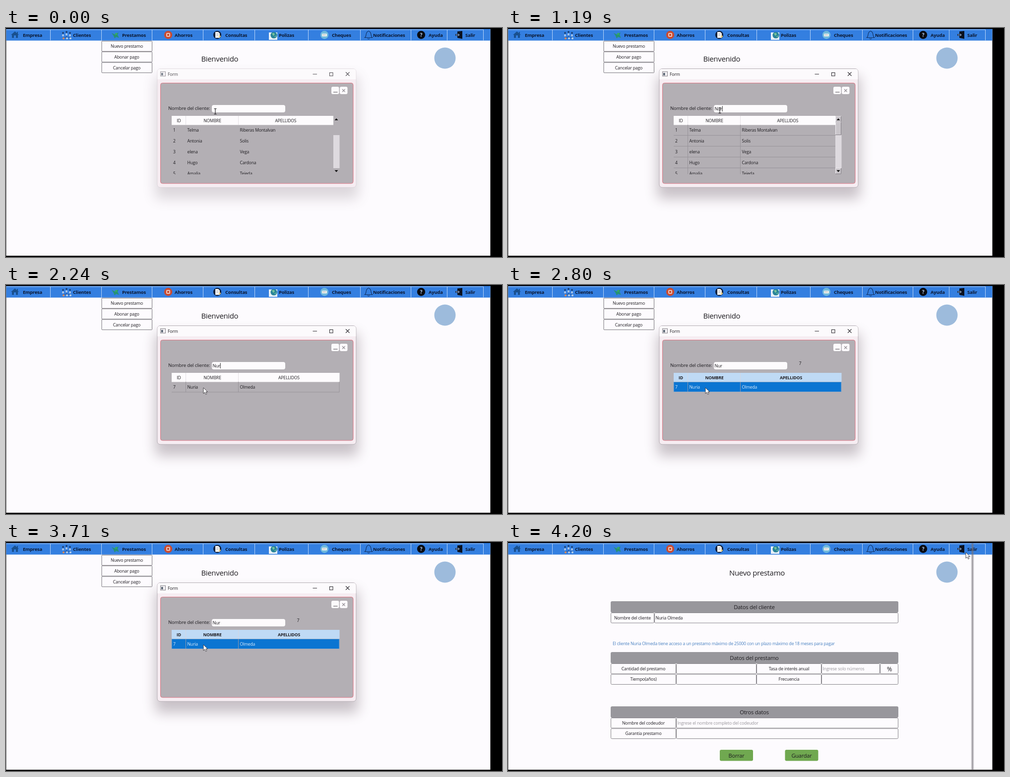
Recreate the animation shown at these times as an HTML page. Size 1000 by 464 pixels, loop 4.27 s.

```html
<!DOCTYPE html>
<html lang="es">
<head>
<meta charset="utf-8">
<title>Nuevo prestamo</title>
<style>
  html, body { margin: 0; width: 100%; height: 100%; overflow: hidden; background: #000; }
  svg { display: block; width: 1000px; height: 464px; }
  text { font-family: "Open Sans", "Noto Sans", sans-serif; letter-spacing: -.02em; fill: #1e1c20; white-space: pre; }
</style>
</head>
<body>
<svg id="stage" viewBox="0 0 1000 464" xmlns="http://www.w3.org/2000/svg">
  <defs>
    <filter id="soft" x="-20%" y="-25%" width="140%" height="160%"><feGaussianBlur stdDeviation="13"/></filter>
    <clipPath id="tableClip"><rect x="333" y="177" width="340" height="119.5"/></clipPath>
    <linearGradient id="edgeFade">
      <stop offset="0" stop-color="#77737a" stop-opacity="0"/>
      <stop offset=".5" stop-color="#77737a" stop-opacity=".75"/>
      <stop offset="1" stop-color="#77737a" stop-opacity="0"/>
    </linearGradient>
  </defs>
  <rect width="1000" height="464" fill="#000"/>
  <rect x=".5" y="2" width="976" height="459.5" fill="#fdfbfe"/>
  <g id="menu"></g>
  <circle cx="885" cy="61" r="21.5" fill="#9dbbdc"/>
  <g id="home"></g>
  <g id="loan"></g>
  <g id="pointer"></g>
</svg>
<script>
const LOOP = 4270, STEP = 70;
const $ = id => document.getElementById(id);

function add(parent, tag, attrs, content) {
  const el = document.createElementNS("http://www.w3.org/2000/svg", tag);
  for (const key in attrs) el.setAttribute(key, attrs[key]);
  if (content !== undefined) el.textContent = content;
  parent.appendChild(el);
  return el;
}
const group = (p, attrs = {}) => add(p, "g", attrs);
const rect = (p, x, y, width, height, fill, more = {}) => add(p, "rect", { x, y, width, height, fill, ...more });
const disc = (p, cx, cy, r, fill) => add(p, "circle", { cx, cy, r, fill });
const path = (p, d, stroke, width = 1, fill = "none") =>
  add(p, "path", { d, stroke, "stroke-width": width, fill });
// y is the middle of the capitals
const label = (p, s, x, y, size = 8.7, more = {}) =>
  add(p, "text", { x, y: y + size * .36, "font-size": size, ...more }, s);
const middle = (p, s, x, y, size = 8.7, more = {}) =>
  label(p, s, x, y, size, { "text-anchor": "middle", ...more });
const show = (el, on) => el.setAttribute("display", on ? "inline" : "none");

function buildMenu() {
  const g = $("menu");
  rect(g, .5, 2, 976, 23.5, "#347fe0");
  path(g, "M1 3.5H963", "#a9cbf5");
  [90, 193, 295, 398, 502, 610, 715, 817, 890, 963].forEach(x => path(g, `M${x - .5} 3V25`, "#b9d5f8"));
  const items = { Empresa: 34, Clientes: 135, Prestamos: 234, Ahorros: 340, Consultas: 442,
    Polizas: 550, Cheques: 657, Notificaciones: 740, Ayuda: 852, Salir: 926 };
  for (const name in items)
    label(g, name, items[name], 15, 9.4, { "font-weight": 700, style: "fill:#0b1730" });

  path(g, "M10 14L18 7L26 14H24V20H20V15H16V20H12V14Z", "none", 0, "#19508f");
  rect(g, 22, 8, 2, 4, "#19508f");

  [[115, 10], [122, 8], [129, 10]].forEach(([x, y]) => {
    disc(g, x, y, 1.8, "#193765");
    path(g, `M${x - 1.8} ${y + 7}V${y + 3}H${x + 1.8}V${y + 7}Z`, "none", 0, "#a9c4e6");
  });
  path(g, "M115 19H130M122 16V21", "#24518f", 1);
  [116, 123, 130].forEach((x, i) => disc(g, x, 21, 2, i ? "#b7cfe8" : "#df8a58"));

  path(g, "M213 10L219 13L227 9L225 14L228 20L222 18L219 21L217 16Z", "none", 0, "#269274");
  disc(g, 222, 12, 2.2, "#37aa65");

  disc(g, 327, 14, 8.2, "#c94b32");
  rect(g, 323, 10, 8, 8, "#ecc5ba", { rx: 2 });
  rect(g, 325, 12, 4, 4, "#c94b32");

  disc(g, 426, 14, 8.2, "#10213f");
  path(g, "M422 8H428L431 11V20H422Z", "none", 0, "#f6f5f2");
  path(g, "M424 12H429M424 15H428", "#8d98a8", .8);
  disc(g, 431, 17, 2, "#e0c779");

  rect(g, 530, 9, 17, 15, "#e9f1f7");
  disc(g, 540, 14.5, 6.6, "#28849a");
  path(g, "M536 11L540 10L542 13L539 16ZM541 17L545 15L543 19Z", "none", 0, "#77c49b");

  disc(g, 642, 14, 8.2, "#70b9dc");
  rect(g, 637, 11.5, 10, 5.5, "#f0f2ef", { rx: 1 });
  path(g, "M638 14H645", "#9aa7ab", 1);

  path(g, "M723.5 19.5C727 17 725 9 729 7.5Q731 4.5 733 7.5C737 9 735 17 738.5 19.5ZM729 21Q731 24 733 21", "#123263", 1.2);

  disc(g, 837, 14, 8.2, "#0a0c12");
  middle(g, "?", 837, 14, 10, { "font-weight": 700, style: "fill:#b9d3f4" });

  path(g, "M910 7L920 6V22L910 20Z", "none", 0, "#0b1220");
  path(g, "M906 14H914M911 11L914.5 14L911 17", "#0b1220", 3);
  path(g, "M907 14H914M911.5 11.5L914 14L911.5 16.5", "#bfd8f7", 1);
}

function buildHome() {
  const g = $("home");
  ["Nuevo prestamo", "Abonar pago", "Cancelar pago"].forEach((s, i) => {
    rect(g, 193, 26.5 + 21.7 * i, 101.5, 20.8, "#fdfbfe", { stroke: "#77757a", rx: 1 });
    middle(g, s, 243.5, 37 + 22 * i);
  });
  label(g, "Bienvenido", 393.5, 63, 14.9);

  const shadow = rect(g, 301, 98, 409, 248, "#5a4a55", { rx: 8, filter: "url(#soft)" });
  const frame = rect(g, 305, 82.5, 401, 240.5, "#f6edf2", { rx: 6, stroke: "#b5afb5" });
  path(g, "M305.5 104V88Q305.5 83 311 83H700Q705.5 83 705.5 88V104Z", "none", 0, "#fcfafc");

  const title = group(g);
  rect(title, 311.5, 88.5, 10, 9, "#f2f0f3", { stroke: "#88858b" });
  rect(title, 313, 91, 3.5, 5, "#55606e");
  label(title, "Form", 326, 94);
  path(title, "M618.5 93.5H627M685 89.5L692.5 97M692.5 89.5L685 97", "#333036", 1.1);
  rect(title, 652.5, 90.5, 6.5, 6.5, "none", { stroke: "#333036", "stroke-width": 1.1 });

  rect(g, 311.5, 111.5, 388.5, 203.5, "#b3afb4", { rx: 4, stroke: "#de7583" });
  [656, 673].forEach(x => rect(g, x, 119, 15.5, 15, "#fcfafc", { rx: 3 }));
  path(g, "M660 130H668.5", "#8f8b90", 1.6);
  path(g, "M678 124L683.5 129.5M683.5 124L678 129.5", "#8f8b90", 1.1);

  label(g, "Nombre del cliente:", 327, 163, 9.65);
  rect(g, 415, 156, 148, 15, "#fdfbfd", { rx: 4 });
  const typed = label(g, "", 416.5, 164, 8.9);
  const caret = path(g, "M0 158V169", "#222");
  const chosen = middle(g, "7", 589, 158.5, 8.9);

  const table = group(g, { "clip-path": "url(#tableClip)" });
  const full = group(table), single = group(table);

  const heads = (p, right, centre, fill, weight) => {
    rect(p, 334, 178, right - 334, 18.5, fill);
    path(p, "M362.5 178V196M468.5 178V196", "#d9d5da", .7);
    [["ID", 348.5], ["NOMBRE", 416], ["APELLIDOS", centre]].forEach(([s, x]) =>
      middle(p, s, x, 187.5, 8.6, { "font-weight": weight }));
  };
  const cells = (p, values, y, fill) => [337, 365.5, 471.5].map((x, i) =>
    label(p, values[i], x, y, 8.6, fill ? { style: "fill:" + fill } : {}));

  heads(full, 660, 564, "#fdfbfd", 400);
  const lines = group(full);
  [["Telma", "Riberas Montalvan"], ["Antonia", "Solis"], ["elena", "Vega"], ["Hugo", "Cardona"], ["Amalia", "Tejeda"]]
    .forEach((row, i) => {
      cells(full, [i + 1, ...row], 207 + 21.9 * i);
      path(lines, `M334 ${217.5 + 22 * i}H660`, "#98949a");
    });
  path(lines, "M362.5 196V296M468.5 196V296", "#98949a");

  rect(full, 660, 217, 12.5, 67, "#dedadf");
  const bar = group(full);
  [[179, 11.5], [191, 25.5], [284, 11.5]].forEach(([y, h]) => {
    rect(bar, 660.5, y, 11, h, "#c9c5ca", { stroke: "#f1eef2" });
    path(bar, `M660 ${y + h}H671.5V${y}`, "#858087");
  });
  path(full, "M662.5 187L666 183L669.5 187ZM662.5 288L666 292L669.5 288Z", "none", 0, "#111");

  const match = ["7", "Nuria", "Olmeda"];
  const plain = group(single), active = group(single);
  heads(plain, 672.5, 570.5, "#fdfbfd", 400);
  path(plain, "M334 217H672V196M362.5 196V217M468.5 196V217", "#98949a");
  cells(plain, match, 207);
  heads(active, 672.5, 570.5, "#bfdaf5", 700);
  rect(active, 334, 196.5, 338, 20, "#0b75d2", { stroke: "#8fa9c6" });
  path(active, "M362.5 197V216M468.5 197V216", "#8d97ab");
  cells(active, match, 207, "#e0effc");

  return { shadow, frame, title, typed, caret, chosen, full, single, plain, active, lines, bar };
}

function buildLoan() {
  const g = $("loan");
  const head = (s, y) => {
    rect(g, 207, y, 580, 23, "#98979c", { rx: 3 });
    middle(g, s, 496.5, y + 11.5, 11.2);
  };
  const box = (x1, x2, y, s, hint) => {
    rect(g, x1 + .5, y + .5, x2 - x1 - 1, 20.5, "#fdfbfe", { rx: 2, stroke: "#88868b" });
    if (hint) label(g, s, x1 + 2.5, y + 11, 8.7, { style: "fill:" + hint });
    else if (s) middle(g, s, (x1 + x2) / 2, y + 10.5);
  };
  const grey = "#98959a", dark = "#1e1c20";
  middle(g, "Nuevo prestamo", 502, 63, 15);
  head("Datos del cliente", 120);
  box(207, 295, 143, "Nombre del cliente");
  box(295, 787, 143, "Nuria Olmeda", dark);
  label(g, "El cliente Nuria Olmeda tiene acceso a un prestamo máximo de 25000 con un plazo máximo de 18 meses para pagar",
    211, 205.5, 8.6, { style: "fill:#457fc0" });

  head("Datos del prestamo", 223);
  box(207, 339, 246, "Cantidad del prestamo");
  box(339, 501, 246);
  box(501, 632, 246, "Tasa de interés anual");
  box(632, 750, 246, "Ingrese solo números", grey);
  box(750, 787, 246);
  middle(g, "%", 769, 257, 12.5);
  box(207, 339, 267.5, "Tiempo(años)");
  box(339, 501, 267.5);
  box(501, 632, 267.5, "Frecuencia");
  box(632, 787, 267.5);

  head("Otros datos", 333);
  box(207, 339, 356, "Nombre del codeudor");
  box(339, 787, 356, "Ingrese el nombre completo del codeudor", grey);
  box(207, 339, 377.5, "Garantia prestamo");
  box(339, 787, 377.5);

  [["Borrar", 427], ["Guardar", 558.5]].forEach(([s, x]) => {
    rect(g, x, 421, 67, 22.5, "#70a850", { rx: 3 });
    middle(g, s, x + 33.5, 433, 11);
  });
  return { edge: rect(g, 933, 3, 7, 458, "url(#edgeFade)") };
}

function buildPointer() {
  const g = $("pointer");
  const beam = group(g), arrow = group(g);
  path(beam, "M-2.5 -5.5H2.5M0 -5.5V5.5M-2.5 5.5H2.5", "#1c1a1e", 1.1);
  path(arrow, "M0 0V12L2.8 9.4L4.8 13.6L6.8 12.7L4.9 8.6H8.5Z", "#39363b", .9, "#fff");
  return { beam, arrow };
}

buildMenu();
const home = buildHome(), loan = buildLoan(), pointer = buildPointer();

// [time, x, y]
const track = [[0, 422, 169], [350, 427, 167], [1750, 427, 167], [2170, 398, 208], [3710, 398, 208], [4200, 923, 21]];
const typing = [[0, ""], [420, "N"], [700, "Nu"], [1120, "Nur"]];
const FILTER = 1750, ARROW = 1890, SELECT = 2520, OPEN = 3780, EDGE = 4060;

const ease = k => k * k * (3 - 2 * k);
const ramp = (t, from, to) => ease(Math.min(1, Math.max(0, (t - from) / (to - from))));

function pointAt(t) {
  let i = track.length - 2;
  while (i > 0 && t < track[i][0]) i--;
  const [a, b] = [track[i], track[i + 1]], k = ramp(t, a[0], b[0]);
  return [a[1] + (b[1] - a[1]) * k, a[2] + (b[2] - a[2]) * k];
}

function draw(t) {
  const inLoan = t >= OPEN, filtered = t >= FILTER, selected = t >= SELECT;
  show($("home"), !inLoan);
  show($("loan"), inLoan);
  show(loan.edge, t >= EDGE);

  const settle = ramp(t, 0, 350);
  home.shadow.setAttribute("opacity", .2 + .12 * settle);
  home.frame.setAttribute("stroke-opacity", .3 + .7 * settle);
  home.title.setAttribute("opacity", .8 + .2 * settle);
  home.lines.setAttribute("opacity", settle);
  home.bar.setAttribute("opacity", settle);

  show(home.full, !filtered);
  show(home.single, filtered);
  show(home.plain, !selected);
  show(home.active, selected);
  show(home.chosen, selected);

  const word = typing.filter(step => t >= step[0]).pop()[1];
  home.typed.textContent = word;
  show(home.caret, word && !selected);
  if (word && !inLoan)
    home.caret.setAttribute("transform", `translate(${417 + home.typed.getComputedTextLength()} 0)`);

  const [x, y] = pointAt(t);
  $("pointer").setAttribute("transform", `translate(${x} ${y})`);
  show(pointer.beam, t < ARROW);
  show(pointer.arrow, t >= ARROW);
}

const start = performance.now();
function tick() {
  const t = (performance.now() - start) % LOOP;
  draw(Math.floor(t / STEP) * STEP);
  requestAnimationFrame(tick);
}
tick();
</script>
</body>
</html>
```
